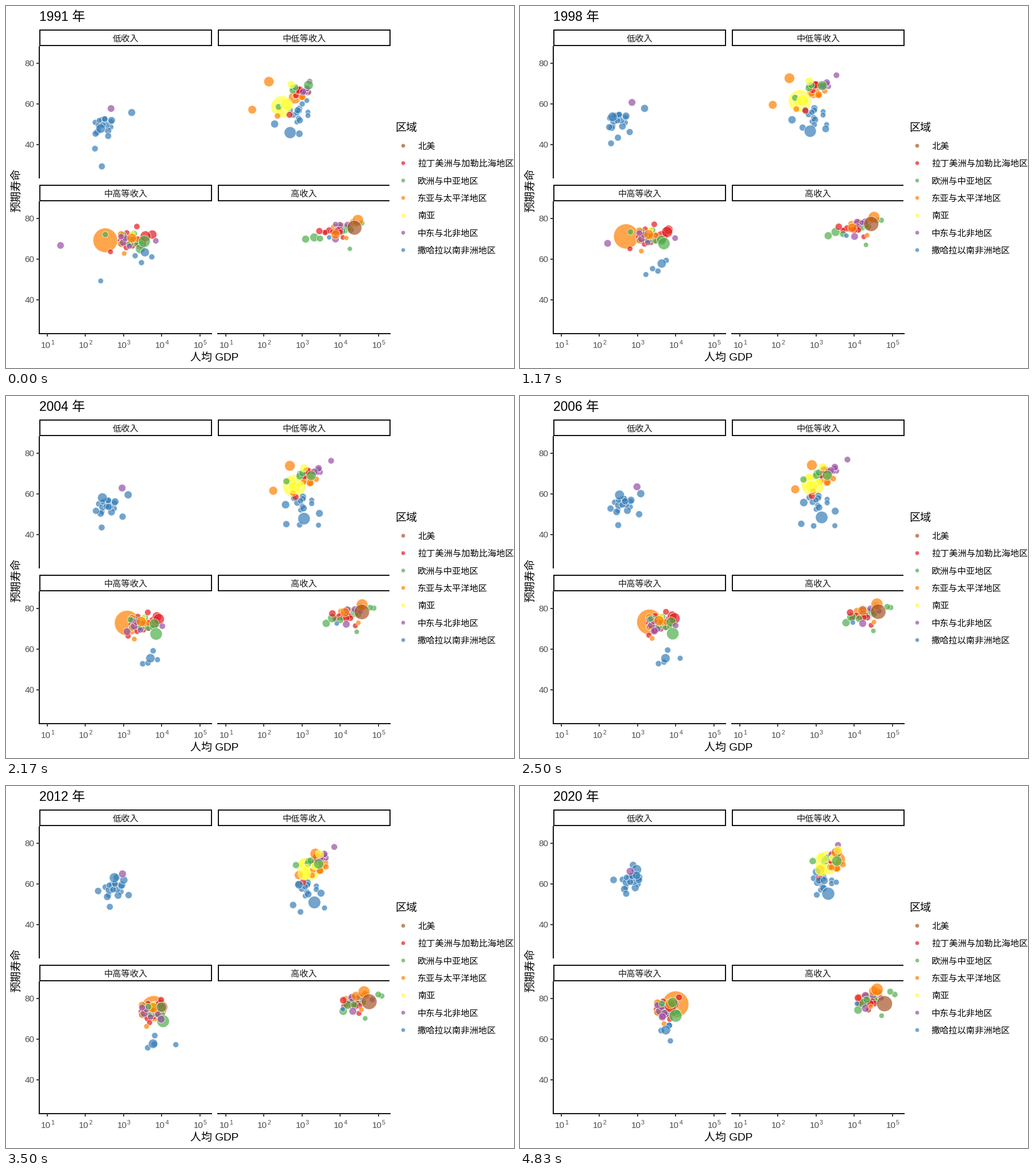
Recreate the animation shown at these times as a matplotlib script. Size 885x632 px, loop 5000 ms.

```python
import numpy as np
import matplotlib.pyplot as plt
from matplotlib.animation import FuncAnimation
from matplotlib.colors import to_rgba
from matplotlib.patches import Rectangle

W, H, DPI = 885, 632, 100
PT = 72 / DPI                # points per pixel
LOOP, TICK_MS, YEARS = 5000, 50, 30
ALPHA = 0.7
BASE = 19                    # text size in pixels
SMALL = 0.8 * BASE
GREY, DARK = "#4D4D4D", "#333333"

BROWN, RED, GREEN, ORANGE, YELLOW, PURPLE, BLUE = (
    "#A65628", "#E41A1C", "#4DAF4A", "#FF7F00", "#FFFF33", "#984EA3", "#377EB8")
REGIONS = [("北美", BROWN), ("拉丁美洲与加勒比海地区", RED), ("欧洲与中亚地区", GREEN),
           ("东亚与太平洋地区", ORANGE), ("南亚", YELLOW), ("中东与北非地区", PURPLE),
           ("撒哈拉以南非洲地区", BLUE)]

plt.rcParams["font.family"] = ["Liberation Sans", "Noto Sans CJK JP"]
rng = np.random.default_rng(8)

u = np.linspace(0, 1, YEARS)
ramp = np.clip((np.arange(YEARS) - 8) / 13, 0, 1)
boom = 0.5 * u + 0.5 * ramp**2 * (3 - 2 * ramp)   # income grows fastest after 2000
arch = np.sin(np.pi * u)                          # detour that starts and ends at zero
bubbles = []


def bubble(color, r, start, end, detour=(0, 0)):
    """One country moving from start to end, by way of a detour."""
    x = start[0] + (end[0] - start[0]) * boom + detour[0] * arch
    y = start[1] + (end[1] - start[1]) * u + detour[1] * arch
    bubbles.append((color, r * (1 + 0.08 * u), x, y))


def flock(color, n, start, end, spread, detour=(0, 0)):
    """Small countries scattered around one path; the richer live longer."""
    for _ in range(n):
        dx, dy = np.clip(rng.normal(size=2), -1.6, 1.6) * spread
        shift = np.array([dx, dy - 0.25 * dx])
        bubble(color, rng.uniform(4.2, 6.3), start + shift, end + shift, detour)


# Low income
flock(BLUE, 14, (170, 209), (193, 169), (9, 7), (-3, 3))
bubble(BLUE, 5.5, (167, 280), (197, 138), (0, -23))
bubble(BLUE, 5.2, (155, 249), (185, 188), (0, 8))
bubble(BLUE, 5.5, (156, 223), (163, 164), (-2, 4))
bubble(BLUE, 5.5, (178, 227), (207, 164), (14, 12))
bubble(BLUE, 7.8, (165, 214), (203, 146), (-12, -6))
bubble(BLUE, 6.3, (219, 186), (203, 156))
bubble(PURPLE, 6, (183, 179), (192, 149), (16, -5))

# Lower middle income
bubble(YELLOW, 19, (481, 176), (535, 134))
bubble(ORANGE, 10.5, (503, 160), (555, 128), (3, -3))
bubble(YELLOW, 9, (477, 183), (526, 126), (0, -8))
flock(BLUE, 10, (510, 189), (527, 168), (10, 8), (0, 6))
flock(ORANGE, 6, (512, 153), (548, 138), (9, 5))
flock(RED, 6, (511, 151), (547, 125), (9, 4), (0, -4))
flock(GREEN, 3, (499, 146), (530, 130), (7, 2))
flock(PURPLE, 5, (523, 145), (549, 115), (5, 4), (10, -4))
flock(YELLOW, 3, (483, 181), (538, 128), (8, 5))
bubble(PURPLE, 5, (529, 132), (554, 103), (28, -6))
bubble(ORANGE, 8.5, (458, 132), (552, 116), (0, -3))
bubble(ORANGE, 7, (429, 181), (523, 146))
bubble(YELLOW, 6.5, (497, 137), (554, 112))
bubble(RED, 5.4, (494, 190), (521, 160))
bubble(ORANGE, 5, (473, 192), (543, 142))
bubble(GREEN, 8, (527, 138), (552, 131), (-5, 4))
bubble(GREEN, 5.4, (475, 176), (510, 131), (0, -7))
bubble(BLUE, 5.5, (508, 182), (521, 165), (-25, 50))
bubble(BLUE, 4.8, (516, 171), (517, 190), (-5, 46))
bubble(BLUE, 4.4, (524, 165), (551, 168), (10, 60))
bubble(BLUE, 6, (511, 223), (530, 165), (28, 8))
bubble(BLUE, 6.5, (468, 206), (517, 150), (0, 9))
bubble(YELLOW, 10, (488, 171), (525, 146))
bubble(BLUE, 10, (495, 221), (537, 188), (8, 8))

# Upper middle income
bubble(RED, 10, (234, 414), (260, 386), (14, -6))
bubble(ORANGE, 21, (173, 409), (271, 381))
for color, n in ((RED, 12), (GREEN, 10), (ORANGE, 5), (PURPLE, 4), (YELLOW, 1)):
    flock(color, n, (218, 407), (257, 387), (11, 8), (4, -2))
bubble(RED, 7.5, (255, 399), (268, 381), (3, -6))
bubble(RED, 9, (243, 402), (262, 385), (16, -5))
bubble(RED, 5, (228, 385), (277, 369))
bubble(RED, 4.5, (182, 429), (261, 407))
bubble(ORANGE, 8, (219, 405), (262, 380))
bubble(ORANGE, 4.2, (206, 432), (251, 415))
bubble(GREEN, 5, (173, 399), (247, 380), (15, 0))
bubble(GREEN, 8, (234, 424), (266, 378), (12, -6))
bubble(GREEN, 10, (241, 411), (271, 401), (9, 9))
bubble(PURPLE, 5, (261, 410), (252, 396), (15, -2))
bubble(PURPLE, 6, (95, 418), (248, 403), (57, 0))
bubble(BLUE, 4.5, (165, 480), (262, 445), (62, -4))
bubble(BLUE, 4.8, (254, 438), (260, 418), (0, 16))
bubble(BLUE, 4.8, (225, 436), (246, 427), (5, 36))
bubble(BLUE, 4.8, (236, 448), (260, 418), (2, 32))
bubble(BLUE, 7.4, (242, 430), (254, 426), (5, 30))

# High income
for color, n in ((GREEN, 20), (ORANGE, 6), (PURPLE, 4)):
    flock(color, n, (594, 386), (614, 369), (14, 4), (5, -2))
flock(RED, 7, (562, 396), (597, 381), (13, 4), (4, 0))
bubble(GREEN, 6.4, (522, 407), (589, 391), (10, -3))
bubble(GREEN, 7.2, (537, 404), (597, 379), (8, -5))
bubble(GREEN, 5.5, (547, 406), (604, 373), (13, 0))
bubble(RED, 5.7, (546, 393), (589, 370), (6, -3))
bubble(RED, 4.3, (587, 404), (607, 391), (14, 3))
bubble(PURPLE, 6, (574, 407), (602, 388), (8, 0))
bubble(PURPLE, 4.5, (574, 381), (629, 370), (22, 0))
bubble(BLUE, 4, (563, 404), (587, 380), (4, 4))
bubble(ORANGE, 7.5, (574, 399), (616, 358), (0, -3))
bubble(ORANGE, 4, (593, 405), (611, 385), (14, 0))
bubble(GREEN, 4, (599, 424), (630, 401), (0, -2))
bubble(GREEN, 4.6, (620, 379), (653, 364), (8, -2))
bubble(GREEN, 5, (610, 380), (645, 359), (11, -1))
bubble(ORANGE, 9.5, (613, 374), (622, 355), (4, -1))
bubble(BROWN, 12.5, (607, 387), (635, 380), (2, -7))

fig = plt.figure(figsize=(W / DPI, H / DPI), dpi=DPI, facecolor="white")
ax = fig.add_axes([0, 0, 1, 1])
ax.set(xlim=(0, W), ylim=(H, 0))
ax.axis("off")


def text(x, y, s, size, color="black", **kw):
    return ax.text(x, y, s, fontsize=size * PT, color=color, va="baseline", zorder=6, **kw)


def line(x0, y0, x1, y1, color="black"):
    ax.plot([x0, x1], [y0, y1], color=color, lw=1.85 * PT, solid_capstyle="butt", zorder=2)


def dots(x, y, r, colors):
    return ax.scatter(x, y, s=(2 * PT * r) ** 2, zorder=5, linewidths=PT,
                      c=[to_rgba(c, ALPHA) for c in colors], edgecolors=[(1, 1, 1, ALPHA)])


LEFTS, TOPS, PW, PH = (58, 369), (70, 341), 300.5, 231

names = iter(["低收入", "中低等收入", "中高等收入", "高收入"])
for top in TOPS:
    for left in LEFTS:
        ax.add_patch(Rectangle((left + 0.9, top - 28.4), PW - 1.8, 27.6, fill=False,
                               ec="black", lw=1.85 * PT, joinstyle="miter"))
        text(left + PW / 2, top - 14 + 0.38 * SMALL, next(names), SMALL, "#1A1A1A", ha="center")
    line(58, top, 58, top + PH)
    for i, value in enumerate((80, 60, 40)):
        y = top + 29.7 + 71 * i
        line(53.3, y, 58, y, DARK)
        text(49.5, y + 0.35 * SMALL, str(value), SMALL, GREY, ha="right")

for left in LEFTS:
    line(left - 0.9, 572, left + PW, 572)
    for p in range(1, 6):
        x = left + 13.6 + 66.5 * (p - 1)
        line(x, 572, x, 576.7, DARK)
        text(x - 11, 597, "10", SMALL, GREY)
        text(x + 6.3, 591, str(p), 0.7 * SMALL, GREY)

text(363.5, 618.5, "人均 GDP", BASE, ha="center")
ax.text(19, 321.5, "预期寿命", fontsize=BASE * PT, rotation=90, ha="center", va="center")

# The legend's white ground hides a bit of the last strip
ax.add_patch(Rectangle((667.6, 192), W - 667, 255, fc="white", ec="none", zorder=4))
text(678, 211 + 0.38 * BASE, "区域", BASE)
rows = 244 + 30.35 * np.arange(len(REGIONS))
for (name, _), y in zip(REGIONS, rows):
    text(717, y + 0.38 * SMALL, name, SMALL)
dots(np.full(len(rows), 692), rows, np.full(len(rows), 3.7), [c for _, c in REGIONS])

colors, radii, xs, ys = zip(*bubbles)
radii, xs, ys = np.array(radii) + 0.3, np.array(xs), np.array(ys)
cloud = dots(xs[:, 0], ys[:, 0], radii[:, 0], colors)
title = text(57.5, 26.5, "", 1.2 * BASE)


def draw(tick):
    year = (3 * tick + 2) // 10    # ten ticks show three years
    title.set_text(f"{1991 + year} 年")
    cloud.set_offsets(np.column_stack([xs[:, year], ys[:, year]]))
    cloud.set_sizes((2 * PT * radii[:, year]) ** 2)
    return cloud, title


anim = FuncAnimation(fig, draw, frames=LOOP // TICK_MS, interval=TICK_MS, repeat=True)
plt.show()
```
